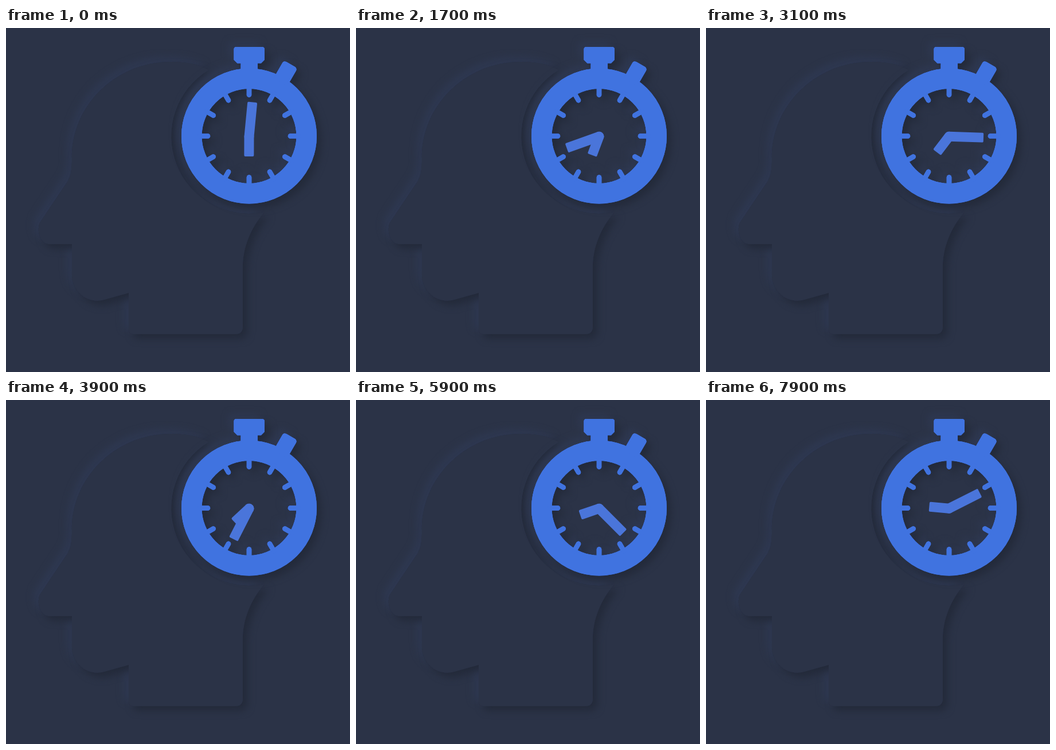
An HTML page for the animation above (8000 ms loop, 600 by 600 pixels).

```html
<!DOCTYPE html>
<html lang="en">
<head>
<meta charset="utf-8">
<title>Stopwatch head</title>
<style>
  html, body { margin: 0; height: 100%; overflow: hidden; background: #2b3347; }
  svg { display: block; width: 100vw; height: 100vh; }
</style>
</head>
<body>
<svg viewBox="0 0 600 600">
  <defs>
    <filter id="soft" filterUnits="userSpaceOnUse" x="0" y="0" width="600" height="600" color-interpolation-filters="sRGB">
      <feDropShadow in="SourceGraphic" dx="-8" dy="-8" stdDeviation="6.5" flood-color="#2e3851" result="light"/>
      <feDropShadow in="SourceGraphic" dx="8" dy="8" stdDeviation="6.5" flood-color="#232a3a" result="dark"/>
      <feMerge>
        <feMergeNode in="light"/>
        <feMergeNode in="dark"/>
        <feMergeNode in="SourceGraphic"/>
      </feMerge>
    </filter>
  </defs>

  <path filter="url(#soft)" fill="#2b3347" d="M115 377H76C60 377 53 355 59 340L108 267Q115 254 115 235V226
    C115 136 190 59 289 59Q326 59 354 73A135 135 0 0 0 451 321C433 341 414 375 413 414V521Q413 534 400 534
    H223Q214 534 214 525V462L171 474C144 482 115 461 115 430Z"/>

  <g filter="url(#soft)">
    <g fill="#4073e0" transform="translate(424 188.5)">
      <circle r="100.25" fill="none" stroke="#4073e0" stroke-width="35.5"/>
      <path d="M-22.5 -155.5H22.5Q27 -155.5 27 -151V-133L21 -127H15V-110H-14.5V-127H-20.5L-26.5 -133V-151Q-26.5 -155.5 -22.5 -155.5Z"/>
      <rect x="-13.5" y="-144.5" width="27.5" height="36" rx="5" transform="rotate(30)"/>
      <g id="ticks" stroke="#4073e0" stroke-width="8.5" stroke-linecap="round"></g>
    </g>
  </g>

  <g fill="#4a75da" transform="translate(424 189.2)">
    <path id="long"/>
    <path id="short"/>
  </g>
</svg>
<script>
  const el = id => document.getElementById(id);

  el('ticks').innerHTML = Array.from({ length: 12 }, (_, i) =>
    `<path d="M0 -72V-86" transform="rotate(${i * 30})"/>`).join('');

  // Round at the pivot, nearly square at the tip.
  const hand = length =>
    `M-8.5 0V${2 - length}q0 -2 2 -2H6.5q2 0 2 2V0A8.5 8.5 0 0 1 -8.5 0Z`;
  el('long').setAttribute('d', hand(60));
  el('short').setAttribute('d', hand(34.8));

  const turn = (id, angle) => el(id).setAttribute('transform', `rotate(${angle})`);

  const start = performance.now();
  function draw() {
    const step = Math.floor((performance.now() - start) % 8000 / 100);
    turn('long', 5.5 + 14.4 * step);
    turn('short', 180.2 + 1.2 * step);
    requestAnimationFrame(draw);
  }
  draw();
</script>
</body>
</html>
```
